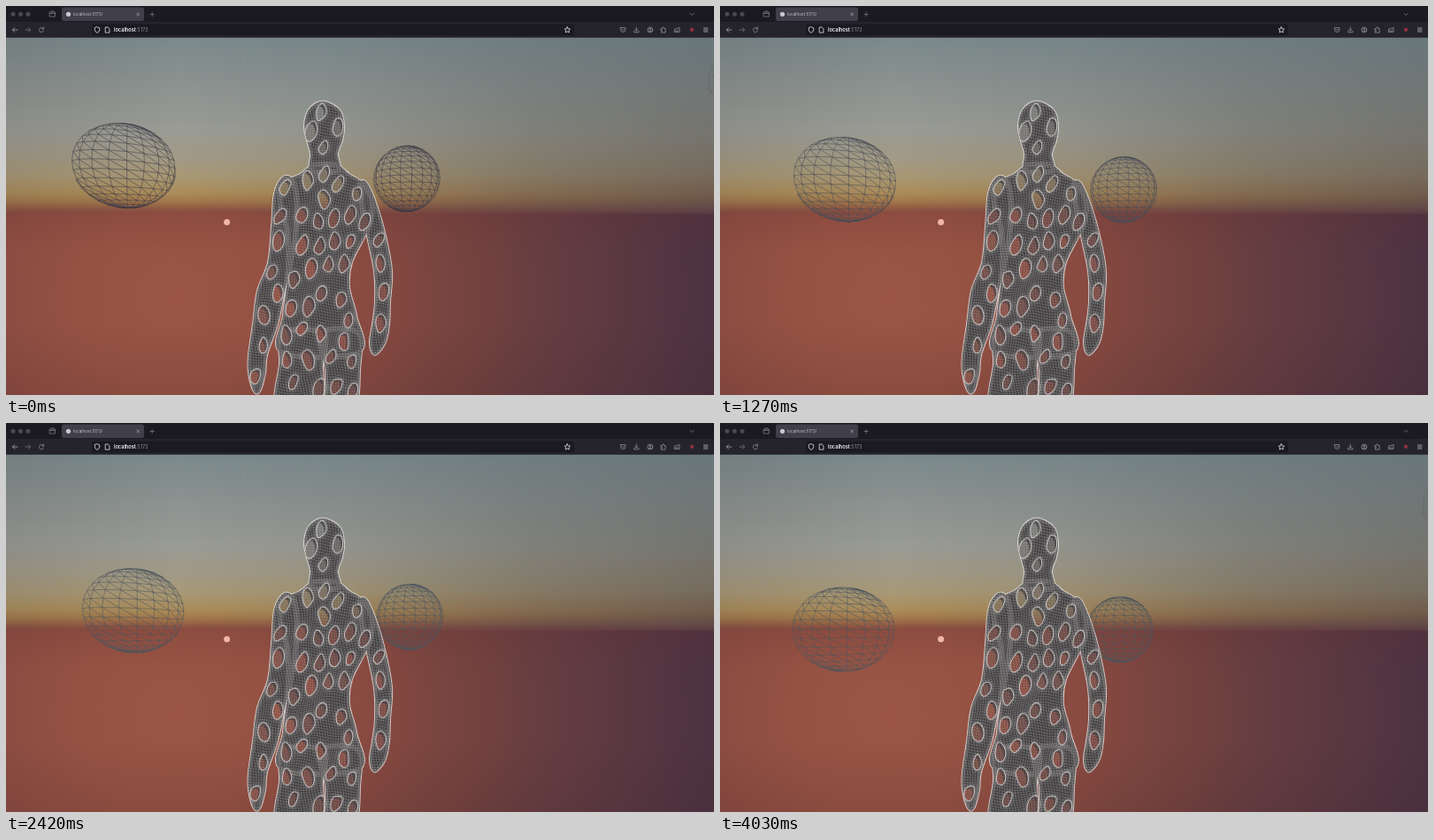
Animation, 800 px wide and 440 px high, one loop 4.06 s. Source, as an HTML page with a canvas:

```html
<!DOCTYPE html>
<html lang="en">
<head>
<meta charset="utf-8">
<title>Wireframe walker</title>
<style>
  html, body { margin: 0; width: 100%; height: 100%; overflow: hidden; background: #1b1a21; }
  .stage { position: relative; width: 800px; height: 440px; overflow: hidden; }
  .stage > * { position: absolute; left: 0; top: 0; }
  .sky, .sky::after { width: 800px; height: 201px; }
  .stage > .sky {
    top: 35px;
    background:
      linear-gradient(90deg, rgba(50,45,45,.12), transparent 25%),
      linear-gradient(#7b898b, #8c9391 27%, #9a9c95 52%, #a19b87 67%, #a99874 79%, #ab8c59 88%, #a1754a 93%, #905643 97%, #884840);
  }
  .sky::after {
    content: ""; position: absolute;
    background: linear-gradient(#69767a, #707675 32%, #75736c 57%, #756b5d 77%, #705b4b 89%, #624a47 96%, #583842);
    -webkit-mask-image: linear-gradient(90deg, transparent 25%, rgba(0,0,0,.22) 48%, rgba(0,0,0,.7) 75%, #000);
    mask-image: linear-gradient(90deg, transparent 25%, rgba(0,0,0,.22) 48%, rgba(0,0,0,.7) 75%, #000);
  }
  .stage > .ground {
    top: 235px; width: 800px; height: 205px;
    background:
      linear-gradient(rgba(100,45,45,.16), transparent 20%, transparent 60%, rgba(50,25,30,.1)),
      radial-gradient(circle 610px at 190px 95px, #9a5545, #955243 18%, #8a4b41 34%, #75433f 54%, #653d41 70%, #573742 87%, #4d3241);
  }
  text { font-family: Inter, "Liberation Sans", sans-serif; }
</style>
</head>
<body>
<div class="stage">
  <div class="sky"></div>
  <div class="ground"></div>
  <canvas id="scene" width="800" height="440"></canvas>
  <svg width="800" height="36" viewBox="0 0 800 36" fill="none" stroke="#a9a8b0" stroke-width=".8" stroke-linecap="round" stroke-linejoin="round">
    <g stroke="none">
      <rect width="800" height="35.5" fill="#1b1a21"/>
      <rect y="18" width="800" height="17.5" fill="#25242d"/>
      <rect x="63" y="1.5" width="93" height="15.5" rx="2.5" fill="#403f4a"/>
      <rect x="97" y="20.5" width="545" height="13" rx="2.5" fill="#1b1a21"/>
      <g fill="#4a4951"><circle cx="8" cy="9.3" r="2.5"/><circle cx="16.5" cy="9.3" r="2.5"/><circle cx="25" cy="9.3" r="2.5"/></g>
      <circle cx="70.5" cy="9.3" r="2.6" fill="#c9c8ce"/>
      <circle cx="775" cy="26.8" r="2.2" fill="#8c303e"/>
      <text x="76" y="11" font-size="4.7" fill="#c2c1c8">localhost:5173/</text>
      <text x="122" y="29" font-size="5.6" fill="#8f8e97"><tspan font-weight="600" fill="#f2f2f4">localhost</tspan>:5173</text>
    </g>
    <g stroke="#77767f">
      <path d="M49.5 7h6v5h-6zM49.5 8.5h6M51 6h3M163 9.5h4.4M165.2 7.3v4.4M773 8.4l2.2 2 2.2-2"/>
      <path d="M22 27h5.6M25.4 24.6l2.4 2.4-2.4 2.4"/>
    </g>
    <path d="M147.8 8l2.8 2.8M150.6 8l-2.8 2.8M13 27H7.4M9.8 24.6L7.4 27l2.4 2.4"/>
    <path d="M42.2 25.6a2.6 2.6 0 1 0 .3 2.4M42.6 24v2h-2" stroke="#8e8d96"/>
    <path stroke="#e6e5ea" d="M103 23.8l2.7 1v2.4q-.3 2-2.7 3.2-2.4-1.2-2.7-3.2v-2.4zM112.6 24h2.6l1.7 1.7v4.4h-4.3zM634.3 23.7l1 2.1 2.3.3-1.7 1.6.4 2.3-2-1.1-2 1.1.4-2.3-1.7-1.6 2.3-.3z"/>
    <path stroke="#92919a" d="M694.5 24.6h5.4v2.2a2.7 2.7 0 0 1-5.4 0zM695.9 26.4l1.3 1.3 1.3-1.3M712.3 24v4M710.6 26.5l1.7 1.7 1.7-1.7M709.6 28.5v1.3h5.4v-1.3"/>
    <path stroke="#92919a" d="M730.9 27a3 3 0 1 1-6 0 3 3 0 0 1 6 0M726.9 26.3a1 1 0 1 0 2 0 1 1 0 0 0-2 0M726 29q1.9-1.6 3.8 0M740.3 25.5h1.3q0-1.7 1-1.7t1 1.7h1.5v4.6h-4.8v-1.6h1v-1.3h-1zM756 26l5-1.4v4.8h-5.4zM756.5 28h3"/>
    <path stroke="#b5b4bb" d="M788.4 25h4.6M788.4 27h4.6M788.4 29h4.6"/>
  </svg>
</div>
<script>
const W = 800, H = 440, LOOP = 4060;
const FOCAL = 350, EYE_X = 400, EYE_Y = 238;
const ctx = document.getElementById("scene").getContext("2d");

// Key widths of each limb, top to bottom: "y:left-right".
const limbs = {
  head: "109:352-364 119:341-378 136:337-382 152:340-380 167:344-375 186:345-376",
  torso: "180:347-374 190:332-388 201:312-404 225:310-414 255:318-408 290:319-391 318:317-388 350:313-396 392:311-399",
  leftLeg: "370:312-358 405:309-358 455:306-354",
  rightLeg: "370:356-398 412:361-400 455:363-394",
  leftArm: "194:312-322 212:303-328 250:300-328 290:296-322 322:284-315 360:279-307 395:274-295 415:274-293 436:280-287",
  rightArm: "200:400-408 225:402-419 260:408-429 300:416-436 335:417-434 360:414-433 380:411-429 393:414-420"
};

function seeded(seed) {
  return () => (seed = seed * 16807 % 2147483647) / 2147483647;
}

// Closed Catmull-Rom curve through the points.
function smooth(points) {
  const path = new Path2D(), n = points.length, at = i => points[(i + n) % n];
  path.moveTo(...points[0]);
  for (let i = 0; i < n; i++) {
    const [a, b, c, d] = [at(i - 1), at(i), at(i + 1), at(i + 2)];
    path.bezierCurveTo(b[0] + (c[0] - a[0]) / 6, b[1] + (c[1] - a[1]) / 6,
      c[0] - (d[0] - b[0]) / 6, c[1] - (d[1] - b[1]) / 6, c[0], c[1]);
  }
  path.closePath();
  return path;
}

function limbPath(keys) {
  const rows = keys.split(" ").map(key => key.split(/[:-]/).map(Number));
  const left = rows.map(([y, l]) => [l, y]);
  const right = rows.map(([y, , r]) => [r, y]).reverse();
  return smooth([...left, ...right]);
}

// Scatter holes over the body, keeping them apart and off the edges.
function scatterHoles(body, random) {
  const holes = [];
  const inside = (x, y) => ctx.isPointInPath(body, x, y);
  for (let i = 0; i < 9000; i++) {
    const x = 272 + 166 * random(), y = 112 + 326 * random();
    if (!inside(x - 7, y) || !inside(x + 7, y) || !inside(x, y - 8)) continue;
    if (holes.some(h => Math.hypot((x - h.x) / 17, (y - h.y) / 25) < 1)) continue;
    const size = .8 + .35 * random(), tilt = .6 * random() - .1;
    const bumps = Array.from({ length: 7 }, () => .85 + .3 * random());
    holes.push({ x, y, size, tilt, bumps, shade: .1 + .55 * random() });
  }
  return holes;
}

function holePath({ x, y, size, tilt, bumps }, grow = 0) {
  const cos = Math.cos(tilt), sin = Math.sin(tilt);
  return smooth(bumps.map((bump, i) => {
    const angle = i / bumps.length * 2 * Math.PI;
    const u = (5.8 * size * bump + grow) * Math.cos(angle);
    const v = (10 * size * bump + grow) * Math.sin(angle);
    return [x + u * cos - v * sin, y + u * sin + v * cos];
  }));
}

// Fine warped grid covering the figure.
function makeMesh() {
  const mesh = new Path2D(), step = 2.9;
  const warp = (u, v) => [u + 2.4 * Math.sin(v / 12 + u / 23), v + 2.4 * Math.sin(u / 10 + v / 17)];
  const line = (from, to, point) => {
    for (let k = from; k <= to; k += 4) mesh[k === from ? "moveTo" : "lineTo"](...point(k));
  };
  for (let v = 100; v < 446; v += step) line(266, 446, u => warp(u, v));
  for (let u = 266; u < 446; u += step) line(100, 446, v => warp(u, v));
  return mesh;
}

function makeFigure() {
  const sheet = document.createElement("canvas");
  sheet.width = W; sheet.height = H;
  const g = sheet.getContext("2d"), mesh = makeMesh(), body = new Path2D();
  Object.values(limbs).forEach(keys => body.addPath(limbPath(keys)));
  const holes = scatterHoles(body, seeded(77));
  const stroke = (path, width, alpha) => {
    g.lineWidth = width;
    g.strokeStyle = `rgba(236,234,233,${alpha})`;
    g.stroke(path);
  };

  stroke(body, 2, .8);
  g.fillStyle = "#403d3f";
  g.fill(body);
  g.save();
  g.clip(body);
  stroke(mesh, .55, .32);
  stroke(body, 6, .14);
  for (const hole of holes) [1.5, 3.5].forEach(grow => stroke(holePath(hole, grow), .7, .4 - grow * .07));
  for (const hole of holes) {
    const opening = holePath(hole);
    g.save();
    g.clip(opening);
    g.globalCompositeOperation = "destination-out";
    g.fill(opening);
    g.globalCompositeOperation = "source-over";
    g.fillStyle = `rgba(78,72,73,${hole.shade})`;
    g.fill(opening);
    const wall = holePath({ ...hole, x: hole.x - 2.5, y: hole.y + 3 });
    wall.rect(0, 0, W, H);
    g.fillStyle = "rgba(62,57,59,.75)";
    g.fill(wall, "evenodd");
    stroke(mesh, .5, .22);
    g.restore();
    stroke(opening, 1.1, .7);
  }
  g.restore();
  return sheet;
}

// Perspective wire sphere, near faces only.
function sphere(px, py, radius, colour) {
  const rows = 16, cols = 20, fit = FOCAL * (1 + radius * radius);
  const cx = (px - EYE_X) / fit, cy = (py - EYE_Y) / fit;
  const vertex = (row, col) => {
    const v = row * Math.PI / rows, u = col * 2 * Math.PI / cols;
    const n = [-Math.cos(u) * Math.sin(v), -Math.cos(v), -Math.sin(u) * Math.sin(v)];
    const x = cx + radius * n[0], y = cy + radius * n[1], z = 1 + radius * n[2];
    return { x: EYE_X + FOCAL * x / z, y: EYE_Y + FOCAL * y / z, near: n[0] * x + n[1] * y + n[2] * z < .1 };
  };
  ctx.beginPath();
  for (let row = 0; row < rows; row++) {
    for (let col = 0; col < cols; col++) {
      const a = vertex(row, col);
      if (!a.near) continue;
      for (const [dr, dc] of [[1, 0], [0, 1], [1, 1]]) {
        const b = vertex(row + dr, col + dc);
        if (!b.near) continue;
        ctx.moveTo(a.x, a.y);
        ctx.lineTo(b.x, b.y);
      }
    }
  }
  ctx.lineWidth = .75;
  ctx.strokeStyle = colour;
  ctx.stroke();
}

const figure = makeFigure();
const start = performance.now();

function draw(now) {
  const t = Math.max(0, now - start) % LOOP / 1000;
  const cool = Math.min(1, t / 2);
  const tone = `rgba(${64 + 14 * cool},${62 + 24 * cool},${72 + 22 * cool},.75)`;
  ctx.clearRect(0, 0, W, H);
  sphere(143.4 - 1.7 * (t - 2.5) ** 2,
    180.5 + 10.6 * t + 1.6 * t * t - .24 * t ** 3, .1344, tone);
  sphere(456.6 - (t - 1.9) ** 2,
    195.3 + 9 * t + .75 * t * t - .155 * t ** 3, .105, tone);
  sphere(852 + 4 * t * (4.06 - t), 72 + 2.5 * t, .105, "rgba(96,88,84,.3)");
  ctx.drawImage(figure, 0, 0);
  ctx.fillStyle = "#f0b7a4";
  ctx.beginPath();
  ctx.arc(249.6, 244.6, 3.5, 0, 7);
  ctx.fill();
  requestAnimationFrame(draw);
}
requestAnimationFrame(draw);
</script>
</body>
</html>
```
